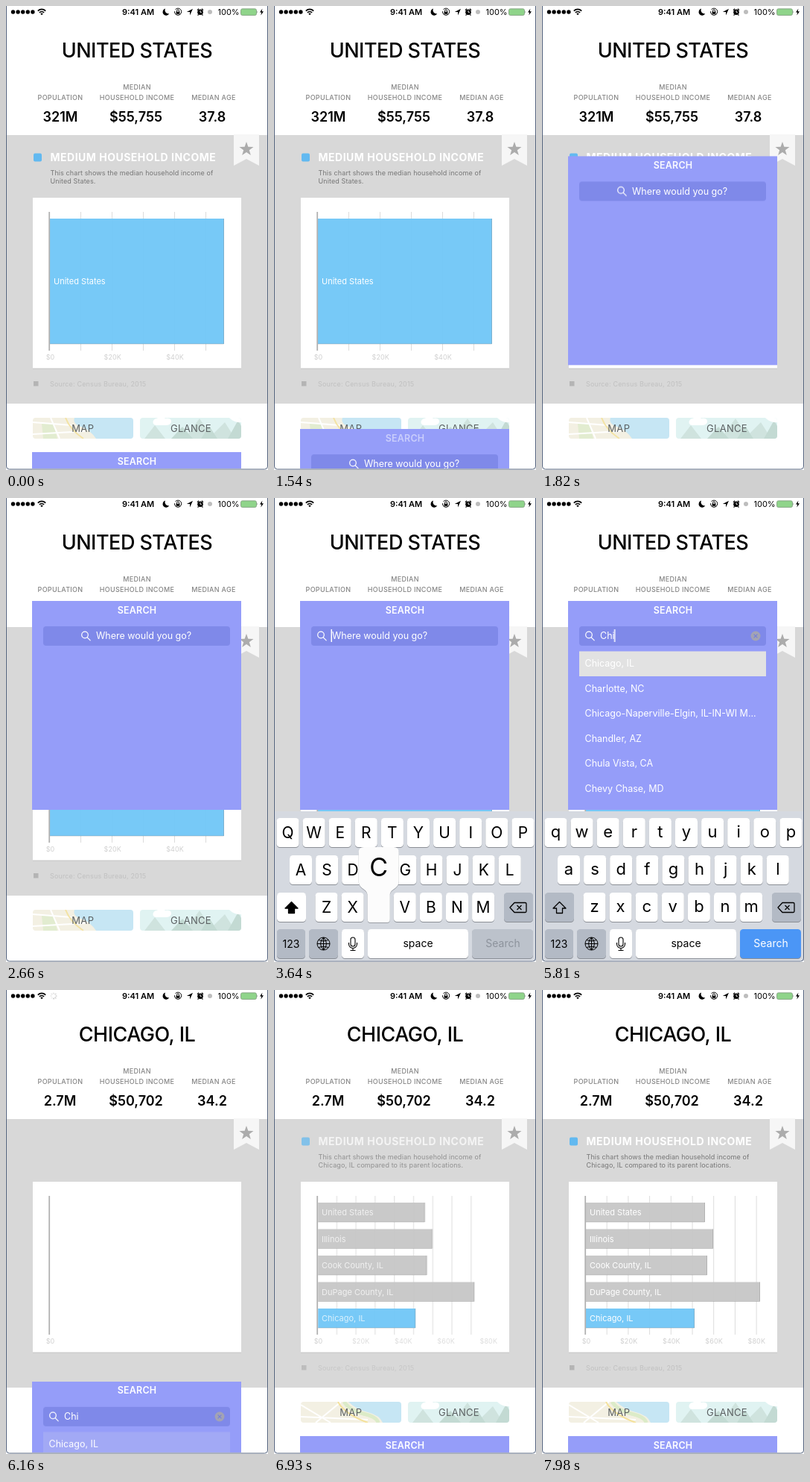
An HTML page that plays this animation: 352x622 px, repeating every 8000 ms.

```html
<!DOCTYPE html>
<html lang="en">
<head>
<meta charset="utf-8">
<title>City income search</title>
<style>
html, body { margin: 0; width: 100%; height: 100%; overflow: hidden; background: #fff; }
svg { display: block; width: 100vw; height: 100vh; font-family: Inter, "Open Sans", sans-serif; }
.mid { text-anchor: middle; }
.title { font-size: 27px; font-weight: 500; letter-spacing: -.5px; }
.stat { font-size: 18px; font-weight: 600; }
.label { font-size: 9px; font-weight: 500; letter-spacing: .3px; fill: #858585; }
.heading { font-size: 14px; font-weight: 700; letter-spacing: .5px; fill: #fff; }
.desc { font-size: 9px; letter-spacing: .1px; fill: #767676; }
.source { font-size: 9px; letter-spacing: .15px; fill: #c0c0c0; }
.tick { font-size: 9px; letter-spacing: .1px; fill: #d0d0d0; }
.grid { stroke: #dcdcdc; vector-effect: non-scaling-stroke; }
.bartext { font-size: 11px; fill: #fff; }
.button { font-size: 13px; letter-spacing: .3px; fill: #5b6062; }
.search { font-size: 12.5px; font-weight: 600; letter-spacing: .2px; fill: #fff; }
.field { font-size: 12.5px; fill: #fff; }
.upper { font-size: 21px; }
.lower { font-size: 22px; }
.func { font-size: 14px; }
.big { font-size: 34px; }

/* hard switches */
.us, .city, .before, .typed, .ch, .ci, .list, .caret, .popC, .popH, .popI, .busy {
  animation: 8s step-end infinite;
}
.us { animation-name: us; }
.city { animation-name: city; }
.before { animation-name: before; }
.typed { animation-name: typed; }
.ch { animation-name: ch; }
.ci { animation-name: ci; }
.list { animation-name: list; }
.caret { animation-name: caret; }
.popC { animation-name: popC; }
.popH { animation-name: popH; }
.popI { animation-name: popI; }
.busy { animation-name: busy; }
@keyframes us { 0% { opacity: 1 } 74%, 100% { opacity: 0 } }
@keyframes city { 0% { opacity: 0 } 74%, 100% { opacity: 1 } }
@keyframes before { 0% { opacity: 1 } 46.25%, 100% { opacity: 0 } }
@keyframes typed { 0% { opacity: 0 } 46.25%, 100% { opacity: 1 } }
@keyframes ch { 0% { fill-opacity: 0 } 52.5%, 100% { fill-opacity: 1 } }
@keyframes ci { 0% { fill-opacity: 0 } 58.75%, 100% { fill-opacity: 1 } }
@keyframes list { 0% { opacity: 0 } 60%, 100% { opacity: 1 } }
@keyframes caret {
  0% { opacity: 0; transform: none }
  36.5% { opacity: 1; transform: none }
  46.25% { opacity: 1; transform: translateX(10px) }
  52.5% { opacity: 1; transform: translateX(17.5px) }
  58.75% { opacity: 1; transform: translateX(20.5px) }
  65% { opacity: 0; transform: translateX(20.5px) }
  71.25% { opacity: 1; transform: translateX(20.5px) }
  73.125%, 100% { opacity: 0 }
}
@keyframes popC { 0% { opacity: 0 } 44.6% { opacity: 1 } 46.25%, 100% { opacity: 0 } }
@keyframes popH { 0% { opacity: 0 } 51.25% { opacity: 1 } 52.5%, 100% { opacity: 0 } }
@keyframes popI { 0% { opacity: 0 } 57.5% { opacity: 1 } 58.75%, 100% { opacity: 0 } }
@keyframes busy { 0% { opacity: 0 } 73.5% { opacity: 1 } 82%, 100% { opacity: 0 } }

/* eased motion */
.panel { animation: panel 8s ease-in-out infinite; }
.press { animation: press 8s linear infinite; }
.hint { animation: hint 8s ease-in-out infinite; }
.pick { animation: pick 8s linear infinite; }
.keyboard { animation: keyboard 8s cubic-bezier(.25, .5, .3, 1) infinite; }
.info { animation: info 8s linear infinite; }
.late { animation: late 8s linear infinite; }
.grow { animation: grow 8s cubic-bezier(.2, .6, .3, 1) infinite; transform-origin: 59px 0; }
.spin { animation: spin .8s steps(8) infinite; transform-origin: 64px 8px; }
@keyframes panel {
  0%, 18.125% { transform: translateY(460px) }
  24.375%, 73.125% { transform: none }
  78.5%, 100% { transform: translateY(460px) }
}
@keyframes press { 0%, 17.4% { opacity: 1 } 17.5%, 20% { opacity: .5 } 23%, 100% { opacity: 1 } }
@keyframes hint { 0%, 35% { transform: translateX(43px) } 38.5%, 100% { transform: none } }
@keyframes pick { 0%, 71.7% { opacity: 0 } 71.75%, 73.125% { opacity: 1 } 77%, 100% { opacity: .18 } }
@keyframes keyboard {
  0%, 35% { transform: translateY(204px) }
  38.75%, 73.125% { transform: none }
  76.5%, 100% { transform: translateY(204px) }
}
@keyframes info { 0%, 73.95% { opacity: 1 } 74%, 83% { opacity: 0 } 88%, 100% { opacity: 1 } }
@keyframes late { 0%, 83% { opacity: 0 } 88%, 100% { opacity: 1 } }
@keyframes grow { 0%, 82% { transform: scaleX(0) } 91%, 100% { transform: none } }
@keyframes spin { to { transform: rotate(360deg) } }
</style>
</head>
<body>
<svg viewBox="0 0 352 622">
  <defs>
    <clipPath id="screen"><rect width="352" height="620"/></clipPath>
    <clipPath id="mapBox"><rect x="36" y="552" width="135" height="28" rx="4"/></clipPath>
    <clipPath id="glanceBox"><rect x="180" y="552" width="136" height="28" rx="4"/></clipPath>
    <path id="balloon" d="M-15 4C-15-6-27-4-27-16V-54q0-7 7-7H20q7 0 7 7V-16C27-4 15-6 15 4V36q0 4-4 4H-11q-4 0-4-4Z"/>
    <g id="lens" fill="none" stroke="#fff" stroke-width="1.2" stroke-linecap="round">
      <circle cx="62" cy="183.5" r="4.3"/><path d="M65.2 186.8l4 4"/>
    </g>
  </defs>
  <rect width="352" height="622" fill="#fff"/>

  <!-- status bar -->
  <g id="dots"></g>
  <g fill="none" stroke="#000" stroke-width="1.7">
    <path d="M42.8 6.6a7.4 7.4 0 0 1 10.4 0M44.9 8.9a4.4 4.4 0 0 1 6.2 0"/>
  </g>
  <path d="M46.3 10.4a2.4 2.4 0 0 1 3.4 0L48 12.2Z"/>
  <g class="busy"><g id="spinner" class="spin" stroke="#999"></g></g>
  <text class="mid" x="177.5" y="12" font-size="11" font-weight="600">9:41 AM</text>
  <path d="M214 3.6a4.6 4.6 0 1 0 5.2 6.6a4.6 4.6 0 0 1-5.2-6.6Z"/>
  <g fill="none" stroke="#000">
    <path d="M227.5 4.8a4.6 4.6 0 1 1-1 2.4"/><path d="M229.4 8v-1.4a1.6 1.6 0 0 1 3.2 0V8"/>
  </g>
  <rect x="228.6" y="7.6" width="4.8" height="3.2"/>
  <path d="M251 3.8L242.8 8H247v4.4Z"/>
  <circle cx="261" cy="8.2" r="3.8"/>
  <path d="M257 5.6l2-2M265 5.6l-2-2M258.6 11.4l-1 1.2M263.4 11.4l1 1.2" stroke="#000" stroke-width="1.3"/>
  <path d="M261 6v2.4h1.8" fill="none" stroke="#fff" stroke-width=".9"/>
  <circle cx="274" cy="8" r="3" fill="#bdbdbd"/>
  <text x="284.5" y="12" font-size="11">100%</text>
  <rect x="315.5" y="3.8" width="21" height="8.6" rx="2" fill="#8fd48a" stroke="#7d9a7b" stroke-width=".8"/>
  <path d="M337.4 6.5q1.6 1.6 0 3.2Z" fill="#7d9a7b"/>
  <path d="M344.4 3.4l-3.4 5.2h2.2l-.8 4 3.6-5.4h-2.3Z"/>

  <!-- header -->
  <g class="us mid">
    <text class="title" x="176" y="69">UNITED STATES</text>
    <g class="stat">
      <text x="73" y="155">321M</text><text x="174.5" y="155">$55,755</text><text x="277" y="155">37.8</text>
    </g>
  </g>
  <g class="city mid">
    <text class="title" x="176" y="69">CHICAGO, IL</text>
    <g class="stat">
      <text x="72.5" y="155">2.7M</text><text x="174.5" y="155">$50,702</text><text x="277" y="155">34.2</text>
    </g>
  </g>
  <g class="label mid">
    <text x="73" y="125.6">POPULATION</text>
    <text x="176" y="111.6">MEDIAN</text><text x="176" y="125.6">HOUSEHOLD INCOME</text>
    <text x="279" y="125.6">MEDIAN AGE</text>
  </g>

  <!-- chart section -->
  <rect y="173" width="352" height="360" fill="#d8d8d8"/>
  <path d="M306 172h34v42l-17-9-17 9Z" fill="#f6f6f6"/>
  <path id="star" fill="#acacac"/>
  <g class="info">
    <rect x="37" y="197.500" width="11" height="11" rx="2" fill="#62b9f0"/>
    <text class="heading" x="59.500" y="208">MEDIUM HOUSEHOLD INCOME</text>
    <g class="desc">
      <text class="us" x="59.500" y="227">This chart shows the median household income of<tspan x="59.500" dy="11">United States.</tspan></text>
      <text class="city" x="59.500" y="227">This chart shows the median household income of<tspan x="59.500" dy="11">Chicago, IL compared to its parent locations.</tspan></text>
    </g>
    <rect x="37" y="503" width="6.500" height="6.500" fill="#b4b4b4"/>
    <text class="source" x="59" y="509.700">Source: Census Bureau, 2015</text>
  </g>
  <rect x="36" y="257" width="280" height="230" fill="#cdcdcd"/>
  <rect x="36" y="257" width="280" height="228.500" fill="#fff"/>
  <g id="usChart" class="us"></g>
  <g id="cityChart"></g>
  <path d="M58.200 276V462" stroke="#b2b2b2" stroke-width="1.800"/>
  <text class="tick mid" x="59.500" y="473.700">$0</text>

  <!-- map and glance buttons -->
  <g clip-path="url(#mapBox)">
    <g class="us">
      <rect x="36" y="552" width="135" height="28" fill="#f3f0e3"/>
      <path d="M92 552H171V580H121q-8-12-20-16t-9-12Z" fill="#c6e6f4"/>
      <path d="M48 560h16l5 20H50Z" fill="#e2ecd0"/>
      <path d="M36 558l52 4M60 552l12 28M36 574l70-4" fill="none" stroke="#fff" stroke-width="2"/>
      <path d="M80 552q6 16 24 28" fill="none" stroke="#f3e3a4" stroke-width="2"/>
    </g>
    <g class="city">
      <rect x="36" y="552" width="135" height="28" fill="#f3f0e3"/>
      <path d="M100 552H171V580H146q-4-10-20-14t-26-14Z" fill="#c6e6f4"/>
      <path d="M94 552q8 12 26 16t20 12" fill="none" stroke="#dcebc8" stroke-width="5"/>
      <path d="M36 556l40 24M56 580l34-28M36 572l90 4" fill="none" stroke="#fff" stroke-width="2"/>
      <path d="M86 552q8 16 40 28" fill="none" stroke="#f5e29c" stroke-width="2"/>
    </g>
  </g>
  <g clip-path="url(#glanceBox)">
    <rect x="180" y="552" width="136" height="28" fill="#e0f3f2"/>
    <path d="M186 580l14-18 14 18ZM240 580l20-27 18 27ZM272 580l22-22 14 22Z" fill="#cfe3de"/>
    <path d="M222 580l15-16 14 16ZM262 580l11-17 11 17ZM298 580l14-25 12 25Z" fill="#c3dad3"/>
    <path d="M198 560a5 5 0 0 1 4-7q8-4 12 0q8-1 8 4t-8 5H202q-3 0-4-2ZM300 552h16v6q-9 1-16-6Z" fill="#fff"/>
  </g>
  <g class="button mid">
    <text x="103.300" y="570.700">MAP</text><text x="248.500" y="570.700">GLANCE</text>
  </g>

  <!-- search panel -->
  <g clip-path="url(#screen)">
    <g class="panel">
      <rect x="35" y="138" width="281" height="280" fill="#959df9"/>
      <text class="search mid press" x="176" y="154.500">SEARCH</text>
      <rect x="50" y="172" width="251" height="26" rx="4" fill="#7f89e9"/>
      <g class="hint">
        <use href="#lens" x="1"/>
        <text class="field before" x="78" y="189.300">Where would you go?</text>
      </g>
      <text class="field typed" x="78" y="189.300">C<tspan class="ch">h</tspan><tspan class="ci">i</tspan></text>
      <rect class="caret" x="76.500" y="176" width="1.500" height="17" fill="#fff"/>
      <g class="typed">
        <circle cx="287" cy="185" r="6.500" fill="#a3a3b4"/>
        <path d="M284.600 182.600l4.800 4.800m0-4.800l-4.800 4.800" stroke="#7480dc" stroke-width="1.200"/>
      </g>
      <g id="results" class="list field">
        <rect class="pick" x="50" y="205.500" width="251" height="33.500" fill="#e2e2e2"/>
      </g>
    </g>

    <!-- keyboard -->
    <g class="keyboard">
      <rect y="420" width="352" height="202" fill="#d5d9e0"/>
      <g id="keys" class="mid"></g>
    </g>
  </g>
  <rect x=".5" y="-10" width="351" height="631" rx="4" fill="none" stroke="#56657f"/>
</svg>
<script>
const $ = id => document.getElementById(id);

function add(parent, tag, attrs, text) {
  const node = document.createElementNS("http://www.w3.org/2000/svg", tag);
  for (const k in attrs) node.setAttribute(k, attrs[k]);
  if (text) node.textContent = text;
  return parent.appendChild(node);
}

// Status bar and star
for (let i = 0; i < 5; i++) add($("dots"), "circle", { cx: 9.5 + i * 6.6, cy: 8, r: 2.7 });
for (let i = 0; i < 8; i++) {
  add($("spinner"), "path", { d: "M64 5.500V3.500", opacity: .3 + i * .1, transform: `rotate(${i * 45} 64 8)` });
}
const starPoints = Array.from({ length: 10 }, (_, i) => {
  const r = i % 2 ? 4 : 10, a = i * Math.PI / 5;
  return [323 + r * Math.sin(a), 192 - r * Math.cos(a)];
});
$("star").setAttribute("d", "M" + starPoints.join("L") + "Z");

// Charts
const blue = "#72c7f7", gray = "#c7c7c7";

function grid(parent, step, count) {
  for (let i = 1; i <= count; i++) {
    const x = 58.5 + i * step;
    add(parent, "path", { class: "grid", d: `M${x} 276V462` });
  }
}
function bar(parent, y, end, height, fill) {
  add(parent, "rect", { x: 59, y, width: end - 59, height, fill, "fill-opacity": .96 });
  add(parent, "path", { d: `M${end - .5} ${y}v${height}H59`, fill: "none", stroke: "#888", "stroke-opacity": .35 });
}
function ticks(parent, step, count) {
  for (let i = 1; i <= count; i++) {
    add(parent, "text", { class: "tick mid", x: 59.5 + i * step, y: 473.7 }, `$${i * 20}K`);
  }
}

const us = $("usChart");
grid(us, 42, 5);
bar(us, 285, 293, 168, blue);
add(us, "text", { class: "bartext", x: 64, y: 373 }, "United States");
ticks(us, 83.8, 2);

const shapes = add($("cityChart"), "g", { class: "grow" });
const captions = add($("cityChart"), "g", { class: "late" });
grid(shapes, 28.7, 8);
ticks(captions, 57.2, 4);
[["United States", 219], ["Illinois", 230], ["Cook County, IL", 222], ["DuPage County, IL", 293], ["Chicago, IL", 205]]
  .forEach(([name, end], i) => {
    const y = 285 + i * 35.5;
    bar(shapes, y, end, 26, i === 4 ? blue : gray);
    add(captions, "text", { class: "bartext", x: 64, y: y + 17 }, name);
  });

// Search results
["Chicago, IL", "Charlotte, NC", "Chicago-Naperville-Elgin, IL-IN-WI M...", "Chandler, AZ", "Chula Vista, CA", "Chevy Chase, MD"]
  .forEach((name, i) => add($("results"), "text", { x: 57.5, y: 226 + i * 33.5 }, name));

// Keyboard
const keys = $("keys"), dim = "#b3bac5";

function key(x, y, width, fill = "#fff", parent = keys) {
  add(parent, "rect", { x, y: y + 1, width, height: 39, rx: 4.5, fill: "#8b8f96" });
  add(parent, "rect", { x, y, width, height: 39, rx: 4.5, fill });
}
function icon(d, attrs = {}, parent = keys) {
  add(parent, "path", { d, fill: "none", stroke: "#000", "stroke-width": 1.3, "stroke-linejoin": "round", ...attrs });
}
const rows = [["QWERTYUIOP", 18.5], ["ASDFGHJKL", 36], ["ZXCVBNM", 70.5]];
const rowTop = r => 429 + r * 50;

rows.forEach(([letters, left], r) => [...letters].forEach((c, i) => {
  const x = left + i * 35.1;
  key(x - 15, rowTop(r), 30);
  add(keys, "text", { class: "upper before", x, y: rowTop(r) + 27 }, c);
  add(keys, "text", { class: "lower typed", x, y: rowTop(r) + 26 }, c.toLowerCase());
}));

const arrow = "M23.500 541.500l8.500 8.500h-4.500v6.500h-8v-6.500H15Z";
const before = add(keys, "g", { class: "before" });
const typed = add(keys, "g", { class: "typed" });
key(4, 529, 39, "#fff", before);
icon(arrow, { fill: "#000" }, before);
key(4, 529, 39, dim, typed);
icon(arrow, {}, typed);
key(266, 578, 82, "#bcc2cb", before);
add(before, "text", { class: "func", x: 307.5, y: 602, fill: "#8d939c" }, "Search");
key(266, 578, 82, "#4b96f6", typed);
add(typed, "text", { class: "func", x: 307.5, y: 602, fill: "#fff" }, "Search");

key(309, 529, 39, dim);
icon("M317 549l6-6.500h14.500q1.500 0 1.500 1.500v10q0 1.500-1.500 1.500H323ZM326.500 546l6 6m0-6l-6 6");
key(4, 578, 38, dim);
add(keys, "text", { class: "func", x: 23, y: 602.5 }, "123");
key(47, 578, 39, dim);
icon("M58 597.500a8.500 8.500 0 1 0 17 0a8.500 8.500 0 1 0-17 0H75M66.500 589v17M66.500 589q-8 8.500 0 17q8-8.500 0-17M60 592.500q6.500 3 13 0M60 602.500q6.500-3 13 0", { "stroke-width": 1 });
key(91, 578, 30);
icon("M103 592a3 3 0 0 1 6 0v6a3 3 0 0 1-6 0ZM100.500 596v2a5.500 5.500 0 0 0 11 0v-2M106 603.500v3M102.500 606.500h7", { "stroke-width": 1.1 });
key(126, 578, 135);
add(keys, "text", { class: "func", x: 193.5, y: 602 }, "space");

// Key press balloons
[["C", "popC", 2, 2], ["h", "popH", 1, 5], ["i", "popI", 0, 7]].forEach(([c, cls, r, i]) => {
  const pop = add(keys, "g", { class: cls });
  const at = add(pop, "g", { transform: `translate(${rows[r][1] + i * 35.1} ${rowTop(r)})` });
  add(at, "use", { href: "#balloon", y: 1, fill: "#9a9ea5" });
  add(at, "use", { href: "#balloon", fill: "#fcfcfc" });
  add(at, "text", { class: "big", y: -22 }, c);
});
</script>
</body>
</html>
```
